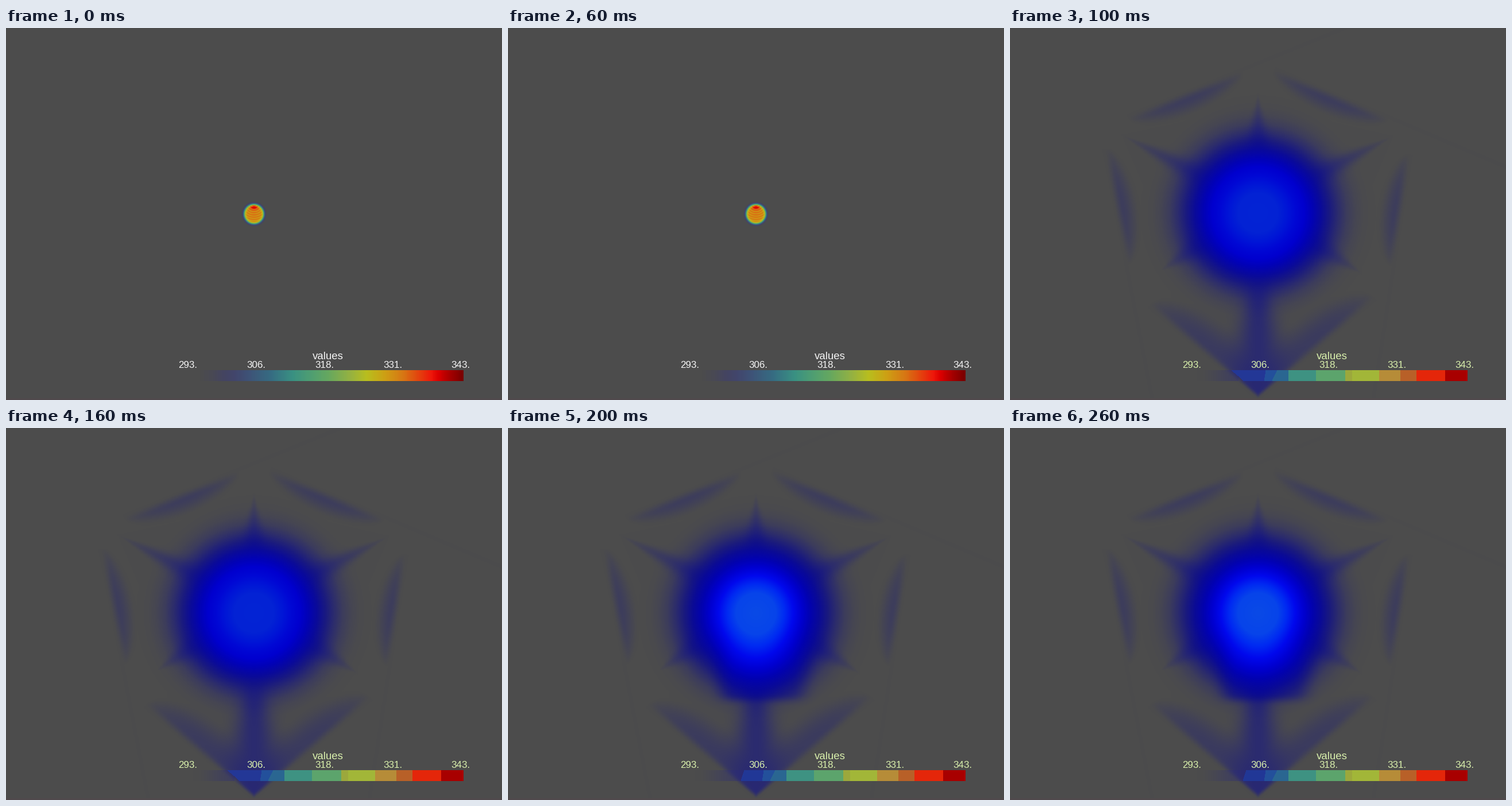
A matplotlib script for the animation above (0.3 s loop, 864 by 648 pixels).

```python
import numpy as np
import matplotlib.pyplot as plt
from matplotlib.animation import FuncAnimation
from matplotlib.colors import LinearSegmentedColormap
from matplotlib.patches import Polygon

W, H, DPI = 864, 648, 100
GREY = np.array([76, 76, 76]) / 255
BLUE = np.array([0, 0, 158]) / 255
CX, CY = 432, 322
TOP, BOTTOM = 596, 615
X, Y = np.meshgrid(np.arange(W) + 0.5, np.arange(H) + 0.5)

SCALE = LinearSegmentedColormap.from_list("heat", [
    (0, "#4c4c4c"), (0.04, "#4c4c4c"), (0.09, "#494955"), (0.13, "#444462"),
    (0.17, "#42466c"), (0.225, "#3e5478"), (0.30, "#366c82"),
    (0.38, "#3a9182"), (0.455, "#52a070"), (0.51, "#66a85f"),
    (0.59, "#96b241"), (0.65, "#b9be1e"), (0.715, "#cda014"),
    (0.78, "#d77814"), (0.83, "#e14b0f"), (0.885, "#ee170a"),
    (0.91, "#dc0000"), (0.95, "#aa0000"), (1, "#780000")], N=256)


def smooth(v, a, b):
    t = np.clip((v - a) / (b - a), 0, 1)
    return t * t * (3 - 2 * t)


def over(base, color, alpha):
    return base + (color - base) * alpha[..., None]


def along(p, q):
    """Position along p-q (0..1) and distance towards the stage centre."""
    dx, dy = q[0] - p[0], q[1] - p[1]
    size = np.hypot(dx, dy)
    t = ((X - p[0]) * dx + (Y - p[1]) * dy) / size ** 2
    n = ((Y - p[1]) * dx - (X - p[0]) * dy) / size
    side = np.sign((CY - p[1]) * dx - (CX - p[0]) * dy)
    return t, n * (side or 1)


def lens(p, q, width, amp):
    t, n = along(p, q)
    bow = np.sin(np.pi * np.clip(t, 0, 1))
    w = width * np.sqrt(bow) + 1
    return amp * bow ** 0.7 * smooth(n, -6, 12) * (1 - smooth(n / w, 0.2, 1))


def spike(p, q, width, amp):
    t, n = along(p, q)
    s = np.clip(t, 0.02, 1)
    return (amp * smooth(t, 0, 1) ** 0.6 * (1 - smooth(t, 1, 1.6))
            * np.exp(-(n / (width * s)) ** 2))


def column():
    wide = 25 + 22 * smooth(Y, 470, 600)
    a = 0.43 * np.exp(-((X - CX) / wide) ** 2) * smooth(Y, 400, 490)
    edge = 646 - np.abs(X - CX) * 0.85 - Y
    return a * smooth(edge, -1, 12)


def cube():
    parts = [
        lens((205, 156), (405, 75), 40, 0.2),
        lens((460, 73), (660, 158), 40, 0.2),
        lens((166, 210), (205, 412), 40, 0.2),
        lens((696, 220), (666, 415), 40, 0.2),
        lens((243, 483), (432, 643), 66, 0.22),
        lens((635, 470), (432, 643), 66, 0.22),
        spike((432, 113), (432, 192), 18, 0.3),
        spike((194, 186), (310, 246), 18, 0.28),
        spike((668, 188), (554, 246), 18, 0.28),
        spike((262, 423), (322, 384), 20, 0.26),
        spike((614, 428), (542, 384), 20, 0.26),
        column(),
    ]
    clear = np.ones_like(X)
    for a in parts:
        clear = clear * (1 - a)
    return over(np.broadcast_to(GREY, (H, W, 3)), BLUE, 1 - clear)


RADII = [0, 35, 50, 65, 80, 95, 110, 125, 140, 155, 170, 185, 205]
FADE = [1, 1, 1, 1, 1, 0.97, 0.86, 0.66, 0.41, 0.2, 0.08, 0.02, 0]


def blob(base, r, red, green, blue):
    rgb = [np.interp(r, RADII[:len(c)], c) / 255 for c in (red, green, blue)]
    return over(base, np.stack(rgb, -1), np.interp(r, RADII, FADE))


def cool(base):
    return blob(base, np.hypot(X - CX, Y - CY), [4, 3, 0],
                [36, 34, 22, 8, 0], [212, 212, 215, 213, 207, 184, 166, 155])


def warm(base):
    dx, dy = X - CX, Y - CY
    bulge = (smooth(dy, 0, 90) * (1 - smooth(dy, 140, 165))
             * (1 - smooth(np.abs(dx - 14), 50, 100)))
    r = np.hypot(dx, dy / (1 + 0.22 * bulge))
    return blob(base, r, [10, 7, 0], [74, 68, 42, 8, 0],
                [230, 234, 242, 237, 208, 178, 162, 152])


def in_bar():
    return (Y > TOP) & (Y < BOTTOM) & (X < 797)


def ball():
    r = np.hypot(X - CX, Y - 324)
    v = np.interp(r, [0, 12, 15, 17, 18.5, 20, 23],
                  [0.77, 0.75, 0.66, 0.45, 0.26, 0.16, 0])
    rings = 0.03 * np.cos(1.6 * np.hypot(X - CX, Y - 306))
    spot = 0.17 * np.exp(-((X - CX) / 7) ** 2 - ((Y - 312) / 4) ** 2)
    v = v + (rings + spot) * (r < 15)
    v = np.where(in_bar(), (X - 317) / 480, v)
    return SCALE(np.clip(v, 0, 1))[..., :3]


def bar_fade(base, end):
    a = 0.34 * smooth(X, 326, 400) * in_bar() * (X < end)
    return over(base, np.array([40, 40, 128]) / 255, a)


def floor_line(img):
    img = img.copy()
    img[645:] = over(img[645:], np.array([84, 72, 76]) / 255,
                     np.full((3, W), 0.6))
    return img


room = cube()
stages = [floor_line(s) for s in (
    ball(), bar_fade(cool(room), 398), bar_fade(warm(room), 410))]

fig = plt.figure(figsize=(W / DPI, H / DPI), dpi=DPI, facecolor=GREY)
ax = fig.add_axes([0, 0, 1, 1])
ax.axis("off")
picture = ax.imshow(stages[0], extent=(0, W, H, 0), interpolation="nearest",
                    aspect="auto")
ax.set_xlim(0, W)
ax.set_ylim(H, 0)


def patch(points, color):
    return ax.add_patch(Polygon(points, fc=color, lw=0, antialiased=False,
                                visible=False))


def block(x0, x1, color):
    return patch([(x0, TOP), (x1, TOP), (x1, BOTTOM), (x0, BOTTOM)], color)


blocks = [block(*b) for b in (
    (485, 533, "#3e9282"), (533, 584, "#5ca46c"), (584, 596, "#9ca83c"),
    (596, 643, "#a2b638"), (643, 680, "#b68c38"), (680, 708, "#b86028"),
    (708, 758, "#e4260a"), (758, 797, "#a80000"))]
blocks += [
    patch([(445, TOP), (466, TOP), (457, BOTTOM), (442, BOTTOM)], "#23509b"),
    patch([(466, TOP), (490, TOP), (485, 605), (485, BOTTOM),
           (457, BOTTOM)], "#2a6691"),
]
blocks[0].set_zorder(1.1)
early = patch([(386, TOP), (445, TOP), (442, BOTTOM), (408, BOTTOM),
               (398, 606)], "#233796")
late = patch([(412, TOP), (445, TOP), (442, BOTTOM), (406, BOTTOM)],
             "#213796")


def label(x, y, s, px):
    return ax.text(x, y, s, ha="center", va="baseline", family="Liberation Sans",
                   fontsize=px * 72 / DPI, color="white", zorder=5)


labels = [label(x, 592, s, 17) for x, s in zip(
    (317, 436, 555, 674, 792), ("293.", "306.", "318.", "331.", "343."))]
labels.append(label(561, 577, "values", 18.6))


def draw(i):
    picture.set_data(stages[i])
    for b in blocks:
        b.set_visible(i > 0)
    early.set_visible(i == 1)
    late.set_visible(i == 2)
    for t in labels:
        t.set_color("#d9f0ac" if i else "#f4f4f4")
    return [picture, *blocks, early, late, *labels]


anim = FuncAnimation(fig, draw, frames=3, interval=100, repeat=True,
                     repeat_delay=0, blit=False)
plt.show()
```
